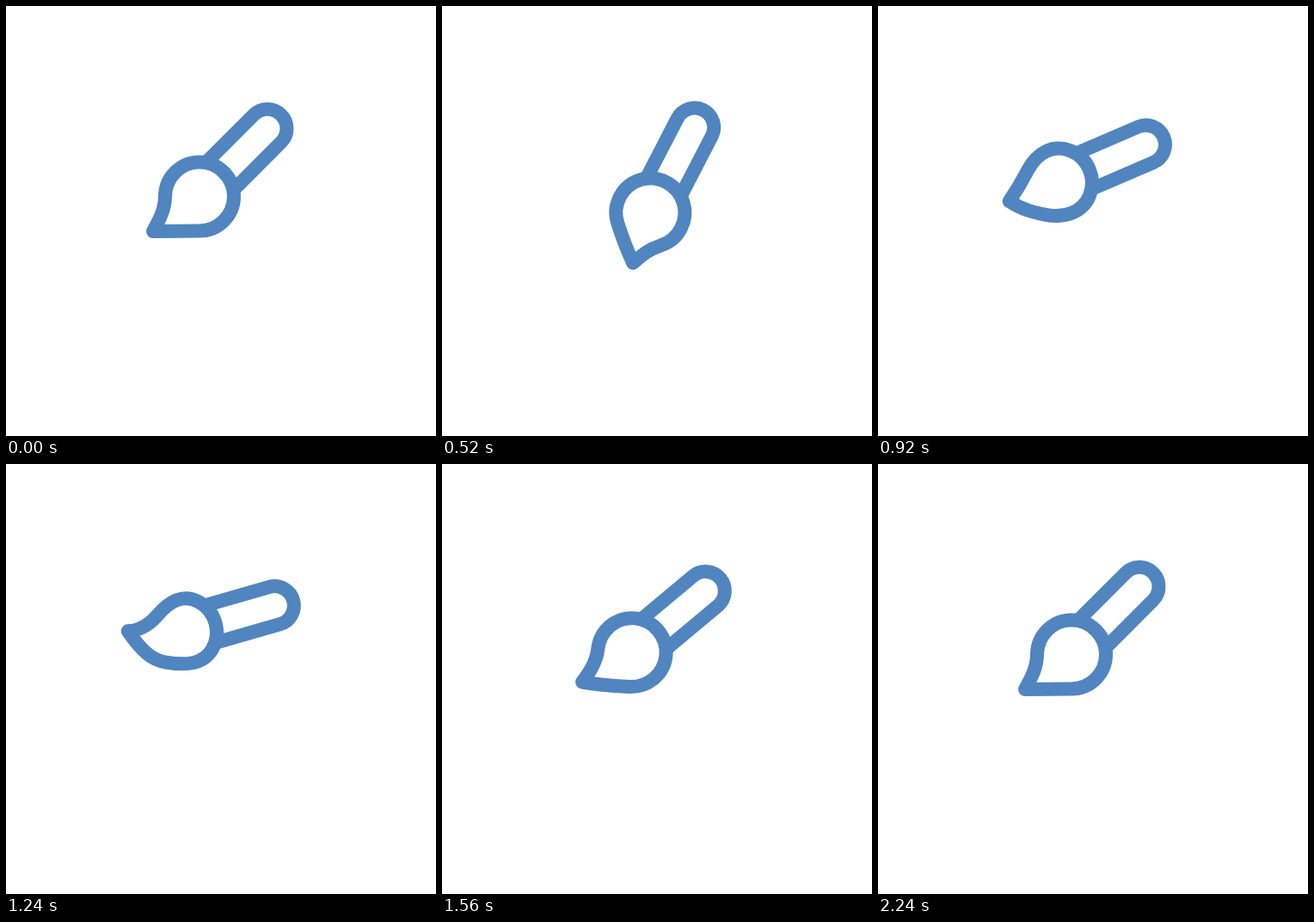
Recreate the animation shown at these times as an HTML page. Size 500 px wide and 500 px high, loop 2320 ms.

```html
<!DOCTYPE html>
<html lang="en">
<head>
<meta charset="utf-8">
<title>Paint brush</title>
<style>
  html, body { margin: 0; width: 100%; height: 100%; overflow: hidden; background: #fff; }
  svg { display: block; width: 100vw; height: 100vh; }
  path { fill: none; stroke: #5085c0; stroke-width: 16; stroke-linejoin: round; }
</style>
</head>
<body>
<svg viewBox="0 0 500 500">
  <g id="brush">
    <path transform="rotate(-45)" d="M33 -22.5H111.7A22.5 22.5 0 0 1 111.7 22.5H33"/>
    <path id="head"/>
  </g>
</svg>
<script>
const LOOP = 2320, STEP = 40;
const R = 40, K = 22; // head radius and its curve handle
const brush = document.getElementById('brush');
const head = document.getElementById('head');

// Bristle shapes: the tip, its two curve handles, and how far the sides slant
const rest = { tip: [-54, 40.5], left: [-47, 28], low: [-40, 40.5], slant: [0] };
const down = { tip: [-32.6, 52], left: [-37, 36], low: [-22, 46], slant: [0] };
const up = { tip: [-56, 29.5], left: [-47, 25], low: [-30, 42.5], slant: [0.35] };

const turn = [[80, 0], [560, -18], [1050, 30], [1180, 30], [1735, -2.5], [2240, 0]];
const dip = [[80, 0], [620, 9.5], [1100, -2.5], [1760, 2.5], [2240, 0]];
const bend = [[80, rest], [700, down], [1140, up], [1220, up], [1640, rest]];

const mix = (a, b, u) => a + (b - a) * u;
const mixShape = (a, b, u) => Object.fromEntries(
  Object.keys(a).map(k => [k, a[k].map((v, i) => mix(v, b[k][i], u))]));

// Value of a track at time t, easing in and out of every key
function at(track, t, blend = mix) {
  const next = track.findIndex(key => key[0] > t);
  if (next === 0) return track[0][1];
  if (next < 0) return track[track.length - 1][1];
  const [t0, a] = track[next - 1], [t1, b] = track[next];
  const u = (t - t0) / (t1 - t0);
  return blend(a, b, u * u * (3 - 2 * u));
}

function headPath({ tip, left, low, slant: [s] }) {
  const neck = [-R + 14 * s, -6 * s], belly = [0, R];
  const along = (p, angle, d) => [p[0] + d * Math.cos(angle), p[1] + d * Math.sin(angle)];
  const neckAngle = Math.PI / 2 + 0.6 * s, bellyAngle = Math.PI - s;
  const curve = (...points) => 'C' + points.join(' ');
  return `M0 ${-R}` +
    curve([K, -R], [R, -K], [R, 0]) +
    curve([R, K], along(belly, bellyAngle, -K), belly) +
    curve(along(belly, bellyAngle, 16), low, tip) +
    curve(left, along(neck, neckAngle, 15), neck) +
    curve(along(neck, neckAngle, -K), [-K, -R], [0, -R]) + 'Z';
}

function draw(time) {
  const t = Math.floor(time % LOOP / STEP) * STEP;
  const angle = at(turn, t);
  const x = 264.5 - 0.2 * angle, y = 182 + at(dip, t);
  brush.setAttribute('transform',
    `translate(${x} ${y}) rotate(${angle}) translate(-39.5 39.5)`);
  head.setAttribute('d', headPath(at(bend, t, mixShape)));
}

const start = performance.now();
function tick() {
  draw(performance.now() - start);
  requestAnimationFrame(tick);
}
tick();
</script>
</body>
</html>
```
